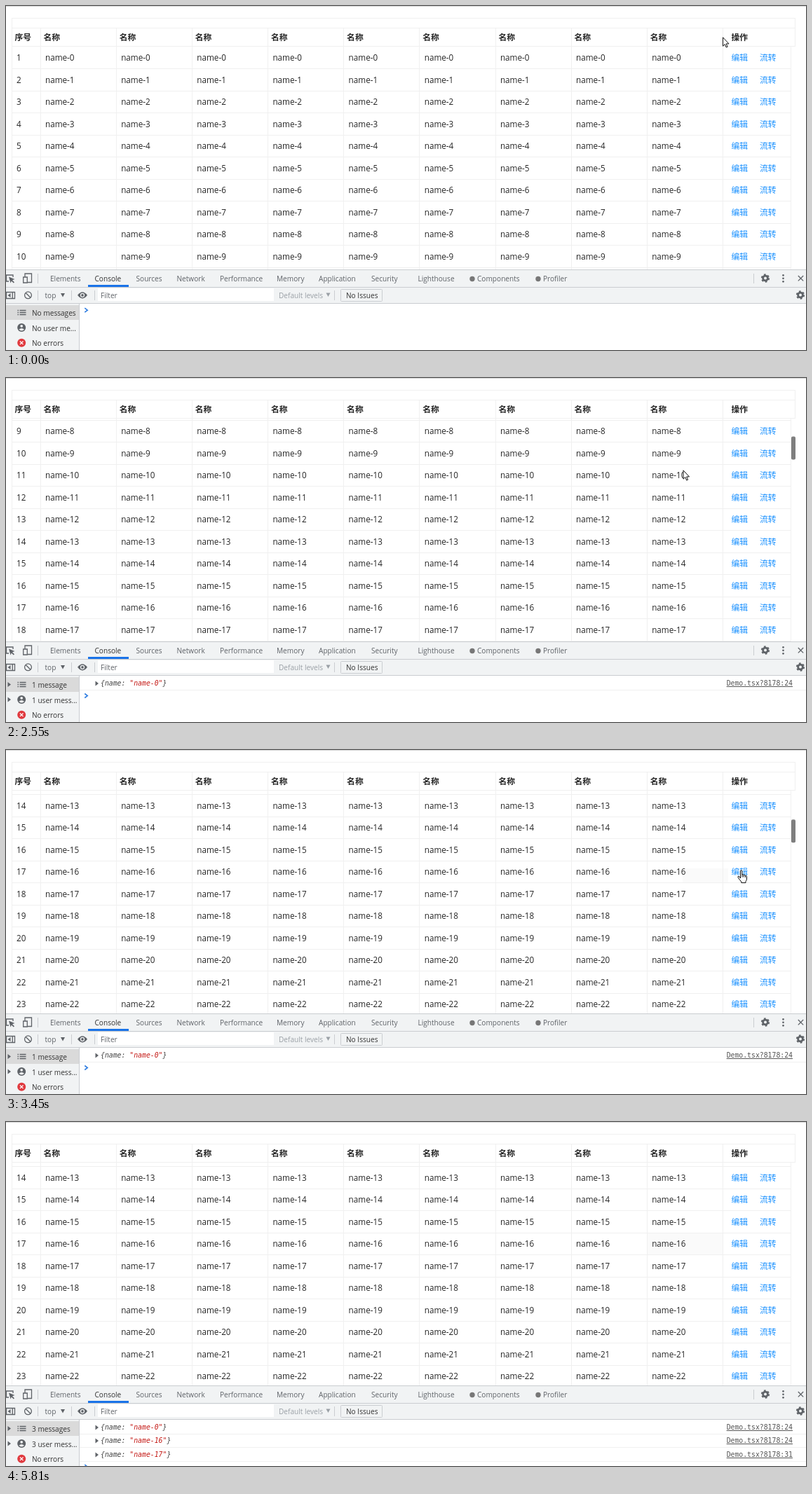
Animation of 1141 by 491 pixels, one loop 6.27 s. Source, as an HTML page:

```html
<!DOCTYPE html>
<html lang="zh">
<head>
<meta charset="utf-8">
<title>Table demo</title>
<style>
  html, body { margin: 0; width: 100%; height: 100%; overflow: hidden; background: #fff; }
  svg { display: block; width: 1141px; height: 491px; }
  text { font: 10.1px "Open Sans", "Noto Sans", sans-serif; fill: #5f6368; white-space: pre; }
  .cell { font-size: 11.7px; fill: #262626; }
  .head, .link { font: 700 11.8px "Noto Sans CJK SC", "Noto Sans CJK", sans-serif; fill: #262626; }
  .link { font-weight: 400; fill: #1890ff; }
  .dark { fill: #333; }
  .pale { fill: #9aa0a6; }
  .mono { font: 9.8px "DejaVu Sans Mono", monospace; fill: #555; }
  .obj { font-style: italic; fill: #444; }
  .str { fill: #c41a16; }
  .ref { text-decoration: underline; text-anchor: end; }
  .icon { fill: none; stroke: #5f6368; stroke-width: 1.3; }
  .solid { fill: #5f6368; }
</style>
</head>
<body>
<svg id="stage" viewBox="0 0 1141 491">
  <defs>
    <clipPath id="body"><rect x="0" y="58" width="1141" height="318"/></clipPath>
    <g id="gear">
      <circle r="3.4" fill="none" stroke="#5f6368" stroke-width="2.8"/>
      <circle r="5.2" fill="none" stroke="#5f6368" stroke-width="1.9" stroke-dasharray="2.7 2.75"/>
    </g>
  </defs>
</svg>
<script>
const LOOP = 6270, PITCH = 31.5, COL = 108.15, LINE = '#f0f0f0', RULE = '#cacdd1';
const stage = document.getElementById('stage');

function add(tag, attrs, parent = stage) {
  const el = document.createElementNS('http://www.w3.org/2000/svg', tag);
  for (const key in attrs) el.setAttribute(key, attrs[key]);
  return parent.appendChild(el);
}
const group = (attrs = {}, parent) => add('g', attrs, parent);
const rect = (x, y, width, height, fill, parent, more) =>
  add('rect', { x, y, width, height, fill, ...more }, parent);
const path = (d, cls, parent, more) => add('path', { d, class: cls, ...more }, parent);
function text(x, y, str, cls = '', parent) {
  const el = add('text', { x, y, class: cls }, parent);
  el.textContent = str;
  return el;
}
const show = (el, on) => el.setAttribute('visibility', on ? 'visible' : 'hidden');
const move = (el, x, y) => el.setAttribute('transform', `translate(${x} ${y})`);

// Table
rect(0, 0, 1141, 1, '#d9d9d9');
const body = group({ 'clip-path': 'url(#body)' });
const hover = rect(965, 169, 65, 21, '#fafafa', body);
const hoverCell = rect(915, 158, 107, 31, '#fafafa', body);
const ring = rect(0, 0, 34, 20, 'none', body, { rx: 3, stroke: '#f0f7ff', 'stroke-width': 5 });

const rows = Array.from({ length: 24 }, (_, k) => {
  const g = group({}, body);
  rect(8, 89, 1112, 1, LINE, g);
  text(15, 78, k + 1, 'cell', g);
  for (let c = 0; c < 9; c++) text(56 + COL * c, 78, 'name-' + k, 'cell', g);
  text(1034.5, 78, '编辑', 'link', g);
  text(1075, 78, '流转', 'link', g);
  return g;
});

for (const y of [17, 31, 57]) rect(8, y, 1118, 1, LINE);
rect(8, 17, 1, 359, LINE);
rect(1125, 17, 1, 41, LINE);
rect(1119, 58, 1, 318, LINE);
for (let c = 0; c < 10; c++) rect(Math.round(48.6 + COL * c), 31, 1, 345, LINE);
text(12.5, 49, '序号', 'head');
for (let c = 0; c < 9; c++) text(53.5 + COL * c, 49, '名称', 'head');
text(1034.5, 49, '操作', 'head');
const thumb = rect(1120, 58, 6, 33, '#7f7f7f', stage, { rx: 2 });

// Tool panel
rect(0, 376, 1141, 115, '#fff');
rect(0, 376, 1141, 49, '#f1f3f4');
for (const y of [376, 401, 424]) rect(0, y, 1141, 1, RULE);
rect(117, 398, 58, 3, '#1a73e8');

const tabs = [[63, 'Elements'], [126.5, 'Console'], [185.5, 'Sources'], [243.5, 'Network'],
  [305, 'Performance'], [386, 'Memory'], [446, 'Application'], [521, 'Security'],
  [587.5, 'Lighthouse'], [672, 'Components'], [766, 'Profiler']];
for (const [x, name] of tabs) text(x, 393, name, name === 'Console' ? 'dark' : '');
for (const cx of [665, 759]) add('circle', { cx, cy: 389.5, r: 3.7, fill: '#777' });

path('M4 393H0.5V384H10V387', 'icon');
path('M4 386.5L12.5 390 9 391.2 12 394.2 10.8 395.4 7.8 392.4 6.5 395.5Z', 'solid');
path('M27 387V382H36.5V394.5H31M24.7 387H30.3V395H24.7Z', 'icon');
for (const [x, y] of [[45, 382], [1066, 382], [45, 406], [93, 406], [126, 406], [468, 406]])
  rect(x, y, 1, 14, RULE);
add('use', { href: '#gear', x: 1083, y: 388.5 });
add('use', { href: '#gear', x: 1133, y: 412.5 });
for (const cy of [384.3, 388.8, 393.3]) add('circle', { cx: 1108.5, cy, r: 1.35, class: 'solid' });
path('M1129.8 385L1137.2 392.4M1137.2 385L1129.8 392.4', 'icon', stage, { 'stroke-width': 1.6 });

path('M0.5 408.5H12.5V417.5H0.5ZM9.3 408.5V417.5', 'icon');
path('M6.5 410V416L2.5 413Z', 'solid');
path('M36.4 412.8A4.9 4.9 0 1 1 26.6 412.8 4.9 4.9 0 1 1 36.4 412.8M28 409.3L35 416.3', 'icon', stage, { 'stroke-width': 1.5 });
text(55.5, 417, 'top');
path('M78 410H84L81 415.5Z', 'solid');
path('M102 412.8Q109 403.5 116 412.8Q109 422 102 412.8Z', 'solid');
add('circle', { cx: 109, cy: 412.8, r: 2.5, fill: '#5f6368', stroke: '#f1f3f4', 'stroke-width': 1.3 });
rect(131, 403, 251, 18, '#fff');
text(135, 417, 'Filter');
text(389, 416.5, 'Default levels', 'pale');
path('M456.5 409.5H462.5L459.5 415Z', 'pale');
rect(477.5, 404.5, 59, 17, '#f1f3f4', stage, { rx: 1, stroke: RULE });
text(485, 416.5, 'No Issues', 'dark');

// Sidebar
rect(0, 425, 104, 66, '#f1f3f4');
rect(0, 427, 104, 21, '#dadada');
rect(104, 425, 1, 66, RULE);
path('M16.5 434.5H18M16.5 437.5H18M16.5 440.5H18M19.5 434.5H28.5M19.5 437.5H28.5M19.5 440.5H28.5', 'icon');
add('circle', { cx: 22.2, cy: 459, r: 6, class: 'solid' });
add('circle', { cx: 22.2, cy: 456.8, r: 1.9, fill: '#f1f3f4' });
path('M18.4 461.8Q22.2 458.2 26 461.8Q22.2 465.4 18.4 461.8Z', '', stage, { fill: '#f1f3f4' });
add('circle', { cx: 22.2, cy: 480.8, r: 6, fill: '#e0393e' });
path('M19.9 478.5L24.5 483.1M24.5 478.5L19.9 483.1', '', stage, { stroke: '#fff', 'stroke-width': 1.3 });
const total = text(37, 441.5, '', 'dark');
const user = text(37, 463.5, '', 'dark');
text(37, 484.5, 'No errors', 'dark');
const arrows = path('M2.5 434V441L7 437.5ZM2.5 455.5V462.5L7 459Z', 'solid');

// Console messages
const logs = [['name-0', 24], ['name-16', 24], ['name-17', 31]].map(([name, line], i) => {
  const g = group();
  const y = Math.round(439 + 19.3 * i);
  rect(105, y + 6, 1036, 1, LINE, g);
  path(`M127.5 ${y - 6.5}V${y + 0.5}L132 ${y - 3}Z`, 'solid', g);
  const obj = text(135, y, '{name: ', 'mono obj', g);
  add('tspan', { class: 'str' }, obj).textContent = `"${name}"`;
  add('tspan', {}, obj).textContent = '}';
  text(1122, y, 'Demo.tsx?8178:' + line, 'mono ref', g);
  return g;
});
const prompt = path('M112.3 -3L116.2 0 112.3 3', '', stage,
  { fill: 'none', stroke: '#2f7de1', 'stroke-width': 1.6 });

// Pointers
const ink = { fill: '#fff', stroke: '#111', 'stroke-width': 1, 'stroke-linejoin': 'round' };
const pointer = {
  arrow: path('M0.5 0.8V13.2L3.3 10.6 5.2 15 7.1 14.2 5.2 9.9H9Z', '', stage, ink),
  hand: path('M4.5 12V2Q4.5 0.6 5.6 0.6T6.8 2V7Q9 5.8 9.2 7.6Q11.2 6.6 11.5 8.4Q13.5 7.8 13.5 9.8V13Q13.5 15 12 16.5V18.5H5.8V17Q3 14 1 10.8Q0.4 9.2 2 9.2Q3.2 9.6 4.5 12ZM7 7V10.5M9.2 7.6V10.5M11.5 8.4V10.8', '', stage, ink)
};

// Held steps: [start in ms, ...values]
const cursorSteps = [
  [0, 'arrow', 1022, 44], [680, 'arrow', 1024, 47], [830, 'arrow', 1028, 52],
  [980, 'arrow', 1034, 58], [1040, 'arrow', 1038, 62], [1190, 'arrow', 1040, 65],
  [1340, 'hand', 1041, 69], [1490, 'hand', 1042, 71],
  [2100, 'arrow', 1030, 88], [2250, 'arrow', 985, 119], [2400, 'arrow', 965.5, 131],
  [3000, 'arrow', 973, 135], [3150, 'arrow', 1000, 149], [3300, 'arrow', 1032, 165],
  [3450, 'hand', 1043, 171], [4360, 'hand', 1054, 177], [4510, 'hand', 1063, 184],
  [4660, 'hand', 1073, 194], [4810, 'hand', 1078, 200],
  [5390, 'arrow', 1098, 190], [5510, 'arrow', 1112, 168], [5660, 'arrow', 1124, 150],
  [5810, 'none', 0, 0]
];
const scrollSteps = [[0, 0], [2550, 250], [2700, 403], [2850, 404]];
const countSteps = [[0, 0], [1950, 1], [3910, 2], [5090, 3]];
const ringSteps = [[0, -99, 0], [1950, 1030, 65], [2550, -99, 0],
  [3910, 1030, 164], [5090, 1070, 195], [5660, -99, 0]];
const held = (steps, t) => steps.findLast(s => s[0] <= t).slice(1);
const within = (t, from, to) => t >= from && t < to;

function draw(t) {
  const [scroll] = held(scrollSteps, t);
  rows.forEach((g, k) => move(g, 0, Math.round(PITCH * k - scroll)));
  thumb.setAttribute('y', 58 + scroll * 0.102);
  show(thumb, within(t, 980, 5810));
  show(hover, within(t, 3450, 3910));
  show(hoverCell, t >= 5510);
  move(ring, ...held(ringSteps, t));

  const [n] = held(countSteps, t);
  logs.forEach((g, i) => show(g, i < n));
  show(arrows, n > 0);
  total.textContent = n ? `${n} message${n > 1 ? 's' : ''}` : 'No messages';
  user.textContent = n ? `${n} user mess...` : 'No user me...';
  move(prompt, 0, 434.2 + 19.3 * n);

  const [kind, x, y] = held(cursorSteps, t);
  for (const name in pointer) {
    show(pointer[name], name === kind);
    move(pointer[name], x, y);
  }
}

const start = performance.now();
function tick() {
  draw((performance.now() - start) % LOOP);
  requestAnimationFrame(tick);
}
tick();
</script>
</body>
</html>
```
